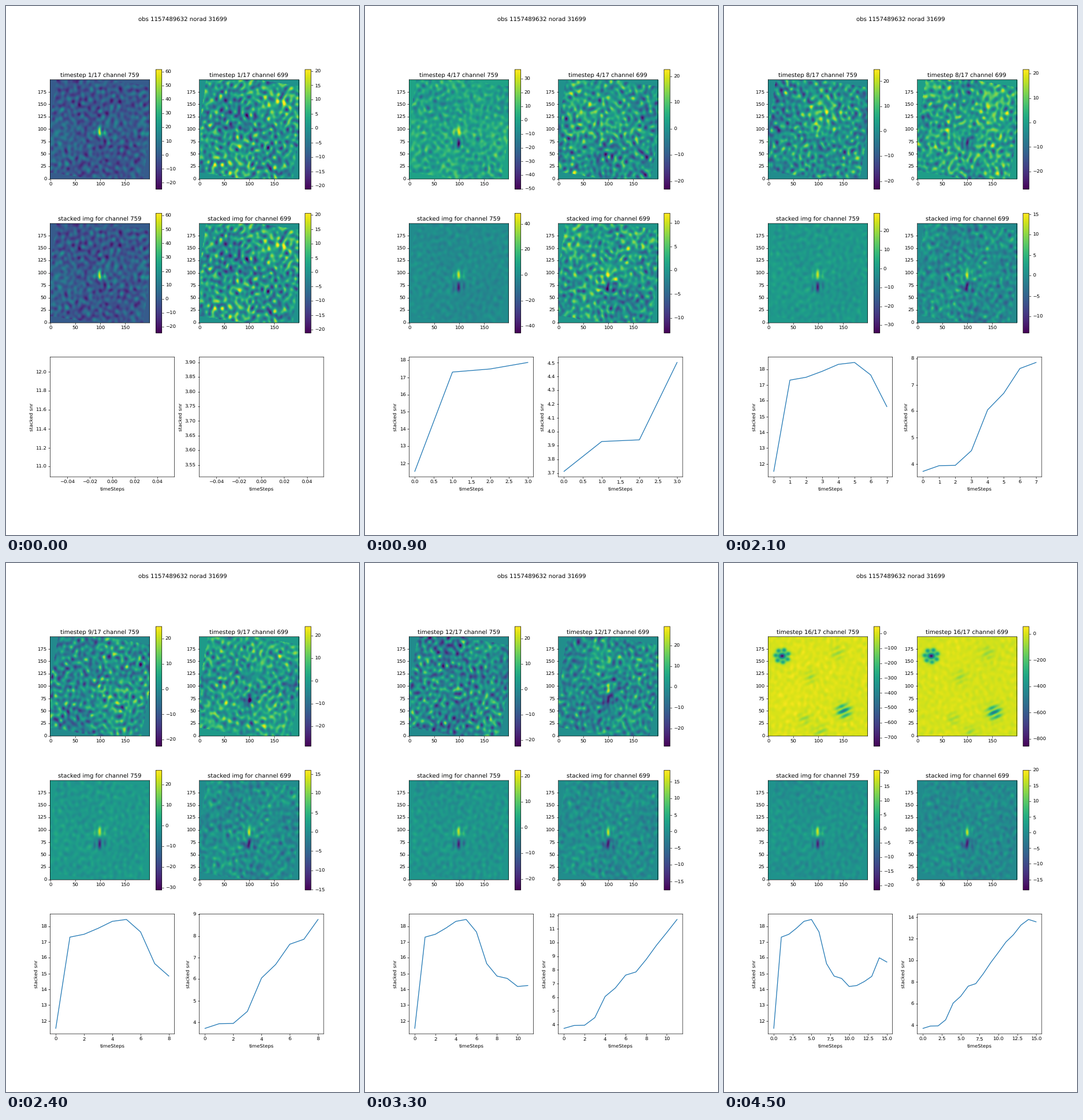
Animation, 611 px wide and 917 px high, one loop 4.8 s. Source, as a matplotlib script:

```python
import numpy as np
import matplotlib.pyplot as plt
from matplotlib.animation import FuncAnimation

plt.rcParams["path.snap"] = False
plt.rcParams["text.hinting"] = "none"

W, H, DPI = 611, 917, 61.1
FRAMES, STEP = 16, 300
LAST = FRAMES - 1
N = 200
CHANNELS = (759, 699)
X, Y = np.meshgrid(np.arange(N), np.arange(N))

SNR = (
    [11.525, 17.31, 17.49, 17.87, 18.31, 18.43, 17.64, 15.63,
     14.84, 14.69, 14.18, 14.24, 14.49, 14.82, 16.0, 15.73],
    [3.714, 3.93, 3.942, 4.502, 6.05, 6.68, 7.62, 7.85,
     8.77, 9.81, 10.74, 11.7, 12.38, 13.27, 13.79, 13.57],
)


def path(i, *points):
    return np.interp(i, *zip(*points))


def fade(i, span, power):
    return np.exp(-abs(i / span) ** power)


def step_limits(i, side):
    """Colour range of a single step; strong interference ends the run."""
    if i == LAST:
        return [(-757, 46), (-856, 57)][side]
    if side == 0:
        return -22.5 - 28 * fade(i - 3.2, 2, 2), 24.7 + 37 * fade(i, 2.85, 2.2)
    return (path(i, (0, -21.2), (5, -24.4), (10, -31.6), (13, -22.1)),
            path(i, (0, 20.5), (3, 22.6), (5, 31.1), (7, 21.7), (10, 28.4), (13, 30.8)))


def stack_limits(i, side):
    if i == 0:
        return step_limits(i, side)
    if side == 0:
        return -21.5 - 26 * fade(i, 8, 2.5), 20.5 + 41 * fade(i, 5.4, 1.6)
    return (path(i, (0, -21.2), (3, -13.2), (5, -11.8), (10, -17.4), (15, -18.4)),
            path(i, (0, 20.5), (3, 12), (13, 20)))


def spectrum_noise(rng, gain):
    field = np.fft.ifft2(np.fft.fft2(rng.normal(size=(N, N))) * gain).real
    return field / field.std()


def noise(seed):
    """Band-limited speckle over a weak, broad unevenness."""
    rng = np.random.default_rng(seed)
    r = np.hypot(np.fft.fftfreq(N)[None, :], 1.15 * np.fft.fftfreq(N)[:, None])
    speckle = spectrum_noise(rng, np.exp(-((r - 0.065) / 0.04) ** 2))
    broad = spectrum_noise(rng, np.exp(-(r / 0.012) ** 2))
    return 5.6 * speckle + 1.8 * broad


def coverage(i):
    """The observed square turns slowly; outside it the value is zero."""
    a = np.radians(8.5 + 0.18 * i)
    u = (X - 99.5) * np.cos(a) - (Y - 99.5) * np.sin(a)
    v = (X - 99.5) * np.sin(a) + (Y - 99.5) * np.cos(a)
    return np.maximum(abs(u), abs(v)) < 100.5 - 0.15 * i


def blob(x, y, sx, sy):
    return np.exp(-((X - x) / sx) ** 2 / 2 - ((Y - y) / sy) ** 2 / 2)


def lobes(y):
    sides = blob(89, y - 2, 2, 6.5) + blob(109, y + 1, 2, 6.5)
    return blob(99, y, 2.6, 7.2) + 0.3 * sides


def pulse(dark, bright):
    return bright * lobes(95.5) + dark * lobes(72)


def above_noise(level):
    """Only peaks that rise over the noise belong to the source."""
    return level * np.clip((abs(level) - 22) / 5, 0, 1)


def stripes(x, y, size, level):
    a = np.radians(24)
    u = (X - x) * np.cos(a) + (Y - y) * np.sin(a)
    v = (Y - y) * np.cos(a) - (X - x) * np.sin(a)
    wave = 0.6 + 0.4 * np.cos(2 * np.pi * v / 11)
    return level * wave * np.exp(-(u ** 2 + v ** 2) / (2 * size ** 2))


def flower(x, y, level):
    out = level * blob(x, y, 4.5, 3.6)
    for a in np.arange(7) * 2 * np.pi / 7 + 0.35:
        out += 0.4 * level * blob(x + 13 * np.cos(a), y + 12.5 * np.sin(a), 3.4, 3)
    return out


def interference(side):
    k = 1 + 0.13 * side
    out = flower(28 - side, 160, -740 * k)
    out += stripes(151 + 2 * side, 50 - 3 * side, 9, -440 * k)
    for x, y in [(140, 166), (72, 35), (105, 8), (85, 118)]:
        out += stripes(x, y, 9, -90)
    return out


def build(side):
    """Images of every step and of the running mean up to it."""
    steps, stacks = [], []
    total = np.zeros((N, N))
    for i in range(FRAMES):
        field = noise(1000 * side + i)
        cover = coverage(i)
        total += field * cover
        if i == LAST:
            steps.append(1.7 * field + interference(side))
        else:
            source = pulse(*map(above_noise, step_limits(i, side)))
            steps.append((field + source) * cover)
        share = 0.95 if side == 0 else path(i, (0, 0), (3, 0.9))
        mean = total / (i + 1) * (1 if side else 0.75)
        stacks.append(mean + share * pulse(*stack_limits(i, side)))
    stacks[0] = steps[0]
    return steps, stacks


fig, axes = plt.subplots(3, 2, figsize=((W + 0.001) / DPI, (H + 0.001) / DPI), dpi=DPI)
fig.suptitle("obs 1157489632 norad 31699")

data = [build(side) for side in (0, 1)]
pictures, lines = {}, []
for side, channel in enumerate(CHANNELS):
    for row in (0, 1):
        ax = axes[row, side]
        im = ax.imshow(data[side][row][0], origin="lower", cmap="viridis",
                       vmin=-1, vmax=1)
        fig.colorbar(im, ax=ax)
        pictures[row, side] = im
    axes[1, side].set_title(f"stacked img for channel {channel}")
    plot = axes[2, side]
    lines.append(plot.plot([], [])[0])
    plot.set_xlabel("timeSteps")
    plot.set_ylabel("stacked snr")


def draw(i):
    for (row, side), im in pictures.items():
        limits = (step_limits, stack_limits)[row]
        im.set_data(data[side][row][i])
        im.set_clim(*limits(i, side))
    for side, channel in enumerate(CHANNELS):
        axes[0, side].set_title(f"timestep {i + 1}/17 channel {channel}")
        lines[side].set_data(range(i + 1), SNR[side][:i + 1])
        axes[2, side].relim()
        axes[2, side].autoscale_view()
    return []


anim = FuncAnimation(fig, draw, frames=FRAMES, interval=STEP,
                     init_func=lambda: draw(0), repeat=True, repeat_delay=0)
plt.show()
```
